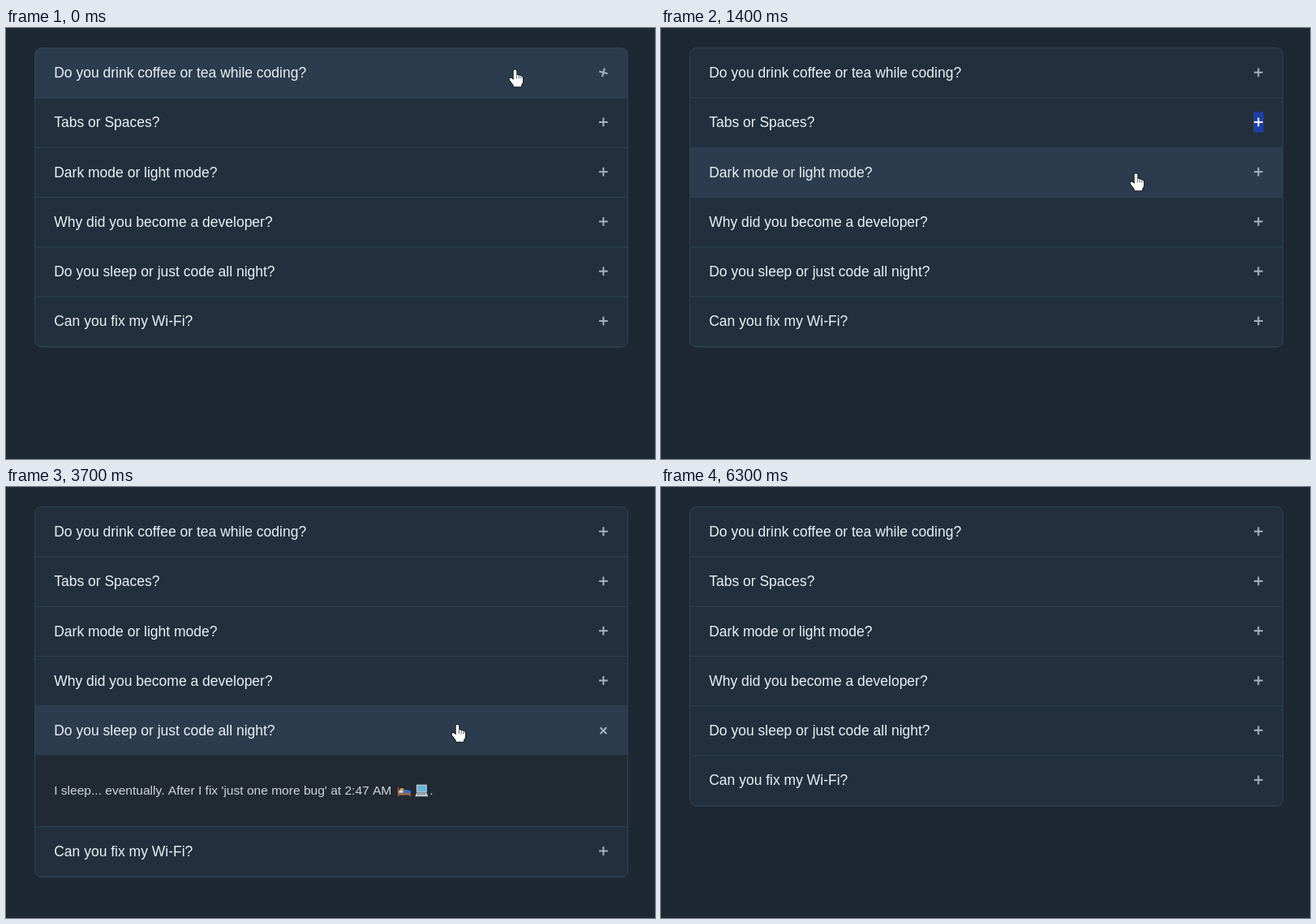
An HTML page with a canvas for the animation above (6400 ms loop, 800x531 px).

```html
<!DOCTYPE html>
<html lang="en">
<head>
<meta charset="utf-8">
<title>FAQ accordion</title>
<style>
  html, body { margin: 0; width: 100%; height: 100%; overflow: hidden; background: #1d2833; }
  canvas { display: block; }
</style>
</head>
<body>
<canvas id="stage" width="800" height="531"></canvas>
<script>
const ctx = document.getElementById('stage').getContext('2d');
const LOOP = 6400, STEP = 100;
const TOP = 25, PITCH = 61.25, PANEL = 87.5;
const LEFT = 35.5, WIDTH = 731, TEXT_X = 59.2, ICON_X = 736.4;
const FONT = '"Liberation Sans", Arial, sans-serif';
const LINE = '#2f4353', CARD = '#22303d', HOVER = '#2c3c4e', BODY = '#212a33';

// open / close: times of the clicks; picked: the second click selects the icon
const rows = [
  { title: 'Do you drink coffee or tea while coding?', open: -600, close: -70, answer: '' },
  { title: 'Tabs or Spaces?', open: 450, close: 800, picked: true,
    answer: 'Tabs. Unless the linter says spaces, then always spaces.' },
  { title: 'Dark mode or light mode?', open: 1450, close: 1860, picked: true,
    answer: 'Dark mode. Light attracts bugs, and I have enough of those.' },
  { title: 'Why did you become a developer?', open: 2450, close: 2870, picked: true,
    answer: "Because making stuff with code feels like magic — and I'm a low-key wizard ",
    icons: [wizard] },
  { title: 'Do you sleep or just code all night?', open: 3500, close: 4100,
    answer: "I sleep... eventually. After I fix 'just one more bug' at 2:47 AM ",
    icons: [bed, laptop] },
  { title: 'Can you fix my Wi-Fi?', open: 4700, close: 5200,
    answer: 'Have you tried turning it off and on again?' }
];

// time, x, y of the fingertip
const path = [
  [0, 627.5, 51], [100, 627, 53], [400, 604.5, 122], [1000, 604.5, 122],
  [1350, 585.5, 179], [2000, 585.5, 179], [2350, 557.5, 246], [3000, 557.5, 246],
  [3350, 556.5, 292.5], [4200, 556.5, 292.5], [4550, 537.5, 352],
  [5650, 537.5, 352], [6150, 560, -30]
];

const clamp = v => Math.max(0, Math.min(1, v));
const smooth = p => p * p * (3 - 2 * p);
const ease = p => 1 - (1 - p) ** 2 * (1 - p * 0.6);

function cursorAt(t) {
  let i = path.findIndex(k => k[0] > t);
  if (i < 0) i = path.length - 1;
  if (i === 0) return path[0].slice(1);
  const [t0, x0, y0] = path[i - 1], [t1, x1, y1] = path[i];
  const p = smooth(clamp((t - t0) / (t1 - t0)));
  return [x0 + (x1 - x0) * p, y0 + (y1 - y0) * p];
}

// Average over a short past, which gives the fade of the background
function hoverAmount(i, t) {
  let sum = 0;
  for (let k = 0; k < 4; k++) {
    sum += Math.floor((cursorAt(t - k * 45)[1] - TOP) / PITCH) === i;
  }
  return sum / 4;
}

function box(x, y, w, h, color) {
  ctx.fillStyle = color;
  ctx.fillRect(x, y, w, h);
}

function shape(points, color) {
  ctx.fillStyle = color;
  ctx.beginPath();
  points.forEach(([x, y]) => ctx.lineTo(x, y));
  ctx.fill();
}

function label(text, x, y, size, color) {
  ctx.font = `${size}px ${FONT}`;
  ctx.fillStyle = color;
  ctx.fillText(text, x, y);
}

// Small pictures in a 16 by 16 box
function wizard() {
  shape([[3, 8], [5, 2], [9, 0], [12, 7]], '#3f78b5');
  shape([[3, 16], [3, 9], [12, 9], [13, 16]], '#4a84bd');
  box(5, 6, 6, 4, '#d8a982');
  shape([[4, 9], [11, 9], [10, 13], [7.5, 15]], '#e3e8ec');
  box(13, 3, 1.4, 13, '#a8794d');
  box(12.5, 1, 2.5, 3, '#79b9dd');
  box(0.5, 3, 2, 2, '#d7bd62');
}

function bed() {
  box(0, 4, 1.6, 11, '#9a6046');
  box(1, 10, 15, 3.5, '#a9694c');
  shape([[5, 10], [7, 6], [16, 8], [16, 11], [5, 11]], '#456fc0');
  box(1.5, 7.5, 5, 3, '#d5dde6');
  box(3, 5, 4, 3, '#dca64f');
  box(14.5, 11, 1.5, 4, '#9a6046');
}

function laptop() {
  box(2, 0.5, 13, 10, '#b9c8d2');
  box(3.2, 1.7, 10.6, 7.5, '#65b3dc');
  shape([[2, 11], [15, 11], [16.5, 15], [0.5, 15]], '#c6d0d7');
  box(3, 12, 10.5, 1.3, '#8796a3');
}

function drawPlus(row, y, t) {
  const closing = t >= row.close;
  const p = ease(clamp((t - (closing ? row.close : row.open)) / 200));
  const turn = closing ? 1 - p : p;
  const next = rows[rows.indexOf(row) + 1];
  const selected = row.picked && t >= row.close - 100 && t < next.open;
  ctx.save();
  ctx.translate(ICON_X, y + 0.4 * turn);
  ctx.rotate(turn * Math.PI / 4);
  if (selected) box(-6.4, -12.5, 12.8, 25, '#1e3fa3');
  const color = selected ? '#f2f5fa' : '#a5b4c1';
  box(-5.4, -1, 10.8, 2, color);
  box(-1, -5.4, 2, 10.8, color);
  ctx.restore();
}

function drawAnswer(row, top) {
  const base = top + 48.8;
  box(LEFT, top, WIDTH, PANEL, BODY);
  label(row.answer, TEXT_X, base, 15.56, '#cfd5da');
  if (!row.icons) return;
  let x = TEXT_X + ctx.measureText(row.answer).width + 3.2;
  for (const icon of row.icons) {
    ctx.save();
    ctx.translate(x, base - 13);
    icon();
    ctx.restore();
    x += 21;
  }
  label('.', x - 2.6, base, 15.56, '#cfd5da');
}

function drawHand([x, y]) {
  ctx.save();
  ctx.translate(x, y);
  const hand = new Path2D('M-1.8 1.5Q0-1.2 1.8 1.5V7.2Q3.5 6 4.7 7.7Q6.2 7 7.3 8.6' +
    'Q9.6 8.3 9.6 11V15Q9.4 17.5 7.6 19.2V21.2H-1.8V19.5L-6.6 13.2' +
    'Q-7.6 11.2-5.7 10.4Q-4.2 10.2-1.8 13Z');
  ctx.lineJoin = 'round';
  ctx.strokeStyle = '#10161c';
  ctx.lineWidth = 2;
  ctx.stroke(hand);
  ctx.fillStyle = '#fff';
  ctx.fill(hand);
  ctx.lineWidth = 0.7;
  ctx.stroke(new Path2D('M1.8 7.5V11.5M4.7 8V11.5M7.3 9V11.5'));
  ctx.restore();
}

function draw(t) {
  box(0, 0, 800, 531, '#1d2833');
  const isOpen = row => t >= row.open && t < row.close;
  const height = 368.6 + (rows.some(isOpen) ? PANEL : 0);
  const card = new Path2D();
  card.roundRect(LEFT, TOP - 0.5, WIDTH, height, 8);

  ctx.save();
  ctx.clip(card);
  box(LEFT, TOP - 1, WIDTH, height + 2, CARD);
  let y = TOP;
  rows.forEach((row, i) => {
    ctx.globalAlpha = hoverAmount(i, t);
    box(LEFT, y, WIDTH, PITCH, HOVER);
    ctx.globalAlpha = 1;
    label(row.title, TEXT_X, y + 36.2, 17.5, '#e9f1f5');
    drawPlus(row, y + 29.7, t);
    if (isOpen(row)) {
      drawAnswer(row, y + PITCH - 0.9);
      y += PANEL;
    }
    y += PITCH;
    box(LEFT, y - 0.7, WIDTH, 1, LINE);
  });
  ctx.restore();

  ctx.strokeStyle = LINE;
  ctx.lineWidth = 1;
  ctx.stroke(card);
  drawHand(cursorAt(t));
}

function frame() {
  const t = performance.now() % LOOP;
  draw(Math.floor(t / STEP) * STEP);
  requestAnimationFrame(frame);
}
frame();
</script>
</body>
</html>
```
